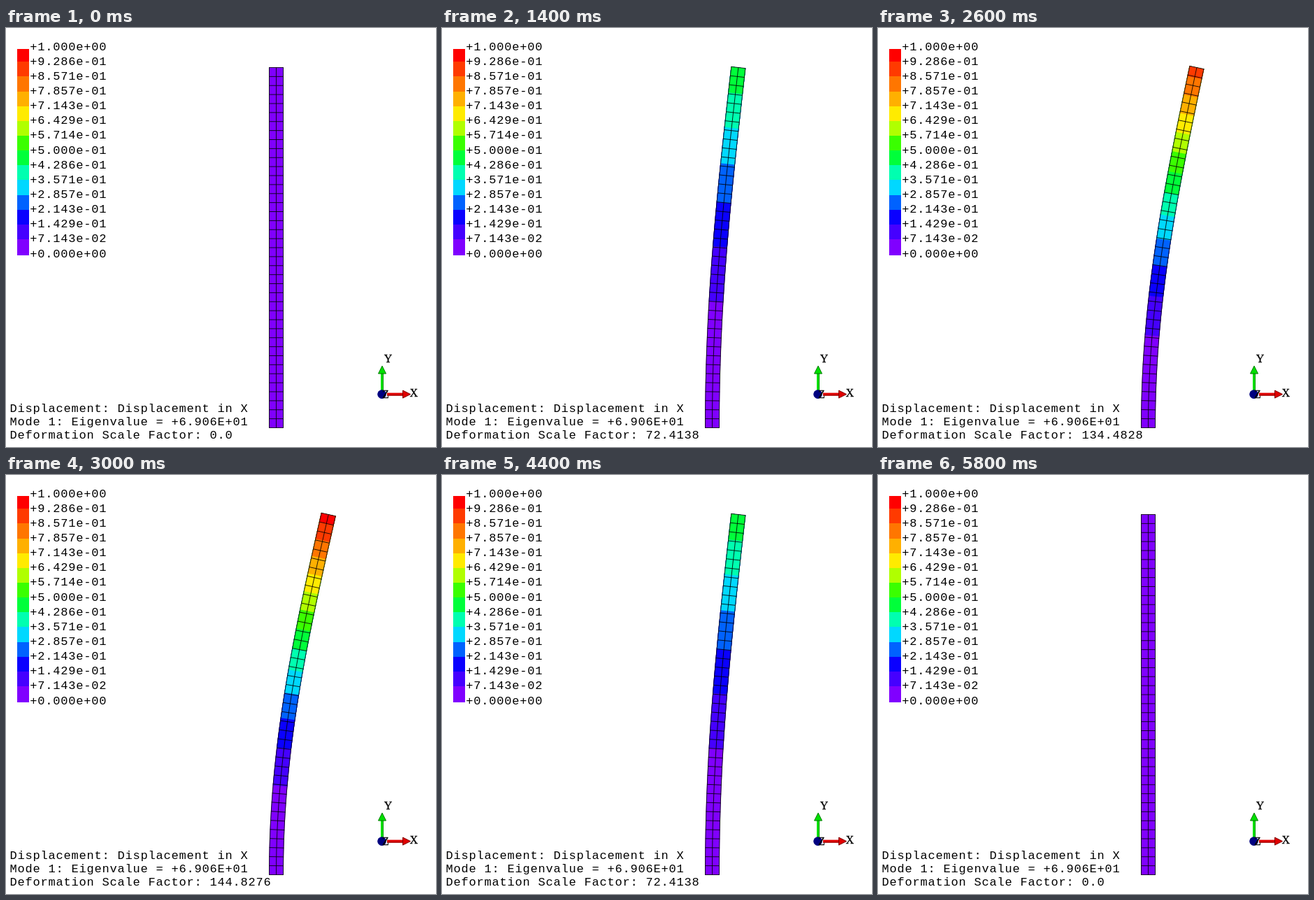
Animation of 615x599 px, one loop 5900 ms. Source, as an HTML page with a canvas:

```html
<!DOCTYPE html>
<html lang="en">
<head>
<meta charset="utf-8">
<title>Buckling mode</title>
<style>
  html, body { margin: 0; width: 100%; height: 100%; overflow: hidden; background: #fff; }
  canvas, svg { position: absolute; left: 0; top: 0; display: block; }
  text { font: 17px "Liberation Mono", "Courier New", monospace; letter-spacing: .8px; white-space: pre; }
  .axis { font: 16px "Liberation Serif", serif; letter-spacing: 0; text-anchor: middle; stroke: #000; stroke-width: .3px; }
</style>
</head>
<body>
<canvas id="beam" width="615" height="599"></canvas>
<svg width="615" height="599" viewBox="0 0 615 599">
  <g id="legend"></g>
  <text x="5.5" y="548.7">Displacement: Displacement in X</text>
  <text x="5.5" y="567.7">Mode 1: Eigenvalue = +6.906E+01</text>
  <text x="5.5" y="586.7" id="scale">Deformation Scale Factor: 0.0</text>
  <g transform="translate(0 -.4)">
    <path d="M536 520V494h4V520z" fill="#00e000"/>
    <path d="M539.5 520V494" stroke="#009a00"/>
    <path d="M538 483.5L543.5 494.5H532.5z" fill="#00e000" stroke="#007a00"/>
    <path d="M545 522H568v4H545z" fill="#e00000"/>
    <path d="M545 525.5H568" stroke="#900000"/>
    <path d="M578.5 524L567.5 518.5V529.5z" fill="#e00000" stroke="#800000"/>
    <circle cx="537.5" cy="524" r="6.3" fill="#000080"/>
  </g>
  <text class="axis" x="546.5" y="478">Y</text>
  <text class="axis" x="583.3" y="527">X</text>
  <text class="axis" x="543" y="529">Z</text>
</svg>
<script>
const COLORS = ['#8000ff', '#4500ff', '#0a00ff', '#0062ff', '#00d8ff', '#00ffb0', '#00ff3a',
                '#3aff00', '#b0ff00', '#ffeb00', '#ffb000', '#ff7600', '#ff3a00', '#ff0000'];
const BANDS = COLORS.length;
const CX = 386.5, BASE = 571.5, HEIGHT = 515, HALF = 10, ROWS = 40;
const MAX_TIP = 77.4, STEPS = 29, STEP_MS = 100, MAX_SCALE = 150;

const ctx = document.getElementById('beam').getContext('2d');
const scaleText = document.getElementById('scale');

function buildLegend() {
  let out = '';
  for (let i = 0; i <= BANDS; i++) {
    const label = '+' + (1 - i / BANDS).toExponential(3).replace(/([+-])(\d)$/, '$10$2');
    out += `<text x="34.3" y="${(31.6 + i * 21.14).toFixed(1)}">${label}</text>`;
    if (i === BANDS) break;
    // Each swatch runs to the end of the bar and is covered by the next.
    const top = i ? Math.round(27.2 + i * 21.14) : 30;
    out += `<rect x="16" y="${top}" width="17" height="${325 - top}" fill="${COLORS[BANDS - 1 - i]}"/>`;
  }
  document.getElementById('legend').innerHTML = out;
}

// Cantilever buckling shape: s runs 0..1 up the beam, off is the distance from its axis.
function point(s, off, tip) {
  const a = s * Math.PI / 2;
  const slope = tip * Math.PI / 2 * Math.sin(a) / HEIGHT;
  return [CX + off + tip * (1 - Math.cos(a)), BASE - HEIGHT * s + slope * off];
}

// Traces one long side of the beam between two heights.
function traceSide(from, to, off, tip) {
  for (let i = 0; i <= ROWS; i++) {
    ctx.lineTo(...point(from + (to - from) * i / ROWS, off, tip));
  }
}

// Fills from s up to the tip; higher bands paint over lower ones.
function fillAbove(s, tip) {
  ctx.beginPath();
  traceSide(s, 1, -HALF - .4, tip);
  traceSide(1, s, HALF + .4, tip);
  ctx.fill();
}

function drawMesh(tip) {
  ctx.beginPath();
  for (let i = 0; i <= ROWS; i++) {
    ctx.moveTo(...point(i / ROWS, -HALF - .4, tip));
    ctx.lineTo(...point(i / ROWS, HALF + .4, tip));
  }
  for (const off of [-HALF, 0, HALF]) {
    ctx.moveTo(...point(0, off, tip));
    traceSide(0, 1, off, tip);
  }
  ctx.lineWidth = .85;
  ctx.stroke();
}

function draw(step) {
  const amount = step / STEPS, tip = amount * MAX_TIP;
  ctx.clearRect(0, 0, 615, 599);
  for (let b = 0; b < BANDS; b++) {
    const level = b / BANDS;
    if (b && level >= amount) break;
    ctx.fillStyle = COLORS[b];
    fillAbove(b ? Math.acos(1 - level / amount) * 2 / Math.PI : 0, tip);
  }
  drawMesh(tip);

  const scale = +(amount * MAX_SCALE).toFixed(4);
  scaleText.textContent = 'Deformation Scale Factor: ' +
    (Number.isInteger(scale) ? scale.toFixed(1) : scale);
}

let shown = -1;
function tick() {
  const k = Math.floor(performance.now() / STEP_MS) % (2 * STEPS + 1);
  const step = Math.min(k, 2 * STEPS - k);
  if (step !== shown) draw(shown = step);
  requestAnimationFrame(tick);
}

buildLegend();
tick();
</script>
</body>
</html>
```
